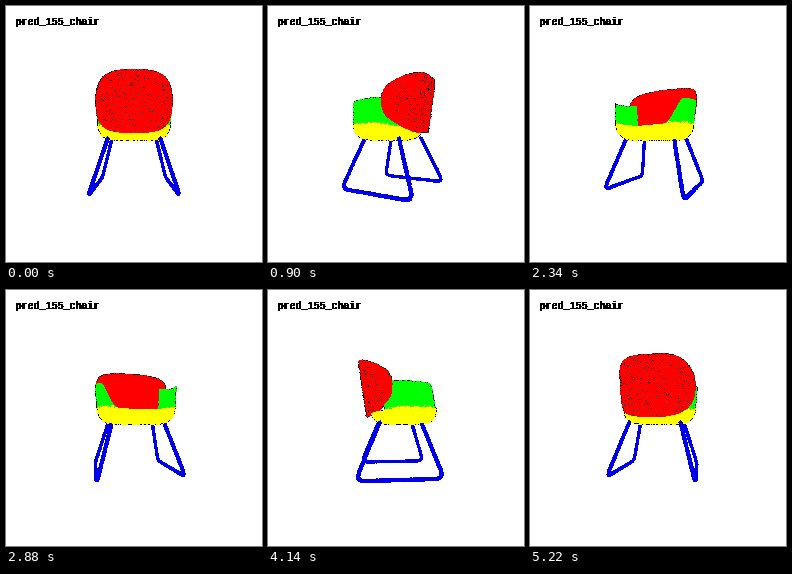
These frames come from a looping animation (256 by 256 pixels, 5400 ms). A matplotlib script:

```python
import numpy as np
import matplotlib.pyplot as plt
from matplotlib.animation import FuncAnimation

SIZE, FRAMES, LOOP = 256, 30, 5400
CAM = 200            # camera distance; one unit is one pixel at the axis
CX, HORIZON = 128, 131

WHITE, RED, GREEN, YELLOW, BLUE, NAVY, BLACK = range(7)
PALETTE = np.array([(255, 255, 255), (255, 0, 0), (0, 255, 0), (255, 255, 0),
                    (0, 0, 238), (0, 0, 170), (0, 0, 0)], np.uint8)
rng = np.random.default_rng(155)


def cloud(u, v, z, color):
    """Rows of u (right), v (front), z (up), color."""
    return np.column_stack([np.ravel(c) for c in np.broadcast_arrays(u, v, z, color)])


def smooth(x):
    x = np.clip(x, 0, 1)
    return x * x * (3 - 2 * x)


def back_rest():
    s, t = np.meshgrid(np.linspace(-1, 1, 260), np.linspace(-1, 1, 220))
    keep = np.abs(s) ** 3 + np.abs(t) ** 3 < 1
    s, t = s[keep], t[keep]
    z = 29.5 + 25.8 * t
    u = 37 * s * (1 - 0.1 * np.maximum(-t, 0))
    bow = 19 + 7 * np.clip(z / 30, 0, 1)
    v = -28 - z / 7 + bow * s ** 4
    shell = cloud(u, v, z, RED)
    specks = shell[rng.random(len(shell)) < 0.0035]
    specks[:, 1] -= 0.8
    specks[:, 3] = BLACK
    return np.vstack([shell, specks])


def plan(phi, scale=1.0):
    """Rounded seat outline; phi = 0 is the front."""
    c, s = np.cos(phi), np.sin(phi)
    r = scale * (np.abs(c) ** 2.6 + np.abs(s) ** 2.6) ** (-1 / 2.6)
    v = 7 + 31 * r * c
    u = 36.5 * r * s * (1 + 0.3 * np.minimum(v, 0) / 24)
    return u, v


def lip(phi, v):
    """Height of the cushion edge, lower at the front and towards the back."""
    return 11.5 - 2.5 * np.exp(-(phi / 0.6) ** 2) + 4 * np.clip(v / 24, -1, 0)


def seat():
    phi, k = np.meshgrid(np.linspace(-np.pi, np.pi, 480), np.linspace(0, 1, 70))
    u, v = plan(phi, 0.58 + 0.42 * np.sqrt(k * (2 - k)))
    side = cloud(u, v, -3 + (lip(phi, v) + 3) * k, YELLOW)
    u, v = plan(phi, 0.58 * k)
    return np.vstack([side, cloud(u, v, -3, YELLOW)])


def arms():
    phi, k = np.meshgrid(np.linspace(-np.pi, np.pi, 560), np.linspace(0, 1, 70))
    u, v = plan(phi)
    base = lip(phi, v)
    rise = smooth((np.degrees(np.abs(phi)) - 30) / 26)
    z = base + (32 + 0.05 * (20 - v) - base) * rise * k
    u, v = u * (1 + 0.05 * k), v * (1 - 0.05 * k)
    color = np.where(z < base + rng.uniform(0, 2, z.shape), YELLOW, GREEN)
    keep = (v > -10) & (rise > 0.02)
    return cloud(u[keep], v[keep], z[keep], color[keep])


def bend(a, b, c, r=8):
    """Points of a rounded corner at b."""
    p = b + (a - b) * r / np.linalg.norm(a - b)
    q = b + (c - b) * r / np.linalg.norm(c - b)
    t = np.linspace(0, 1, 10)[:, None]
    return (1 - t) ** 2 * p + 2 * t * (1 - t) * b + t ** 2 * q


def leg(side):
    a, b, c, d = np.array([(24 * side, -16.7, -1), (37.5 * side, -36.5, -48),
                           (37.5 * side, 36.5, -48), (24 * side, 20, -1)])
    path = np.vstack([[a], bend(a, b, c), bend(b, c, d), [d]])
    dist = np.r_[0, np.cumsum(np.linalg.norm(np.diff(path, axis=0), axis=1))]
    at = rng.uniform(0, dist[-1], 12000)
    core = np.column_stack([np.interp(at, dist, path[:, i]) for i in range(3)])
    ball = rng.normal(size=core.shape)
    ball *= 1.4 / np.linalg.norm(ball, axis=1)[:, None]
    color = np.where(rng.random(len(at)) < 0.12, NAVY, BLUE)
    return cloud(*(core + ball).T, color)


U, V, Z, COLOR = np.vstack([back_rest(), seat(), arms(), leg(-1), leg(1)]).T
COLOR = COLOR.astype(np.uint8)


def render(i):
    angle = 2 * np.pi * i / FRAMES
    c, s = np.cos(angle), np.sin(angle)
    depth = 1 + (U * s + V * c) / CAM
    px = (CX + (U * c - V * s) / depth).astype(int)
    py = (HORIZON - Z / depth).astype(int)
    order = np.argsort(-depth)
    grid = np.zeros((SIZE, SIZE), np.uint8)
    grid[py[order], px[order]] = COLOR[order]

    # dotted dark outline around the shell
    empty = grid == WHITE
    edge = np.zeros_like(empty)
    for axis in (0, 1):
        for step in (-1, 1):
            edge |= np.roll(empty, step, axis)
    edge &= (grid >= RED) & (grid <= YELLOW)
    dots = np.random.default_rng(i).random(grid.shape) < 0.45
    grid[edge & dots] = BLACK
    return PALETTE[grid]


fig = plt.figure(figsize=(2.56, 2.56), dpi=100, facecolor="white")
ax = fig.add_axes([0, 0, 1, 1])
ax.axis("off")
image = ax.imshow(render(0), extent=(0, SIZE, SIZE, 0), interpolation="nearest")
for x in (9, 10):    # doubled for a heavy bitmap look
    ax.text(x, 19, "pred_155_chair", family="Liberation Mono", weight="bold",
            size=7.2, color="black", va="baseline", antialiased=False)


def update(i):
    image.set_data(render(i))
    return [image]


anim = FuncAnimation(fig, update, frames=FRAMES, interval=LOOP / FRAMES,
                     repeat=True, repeat_delay=0)
plt.show()
```
